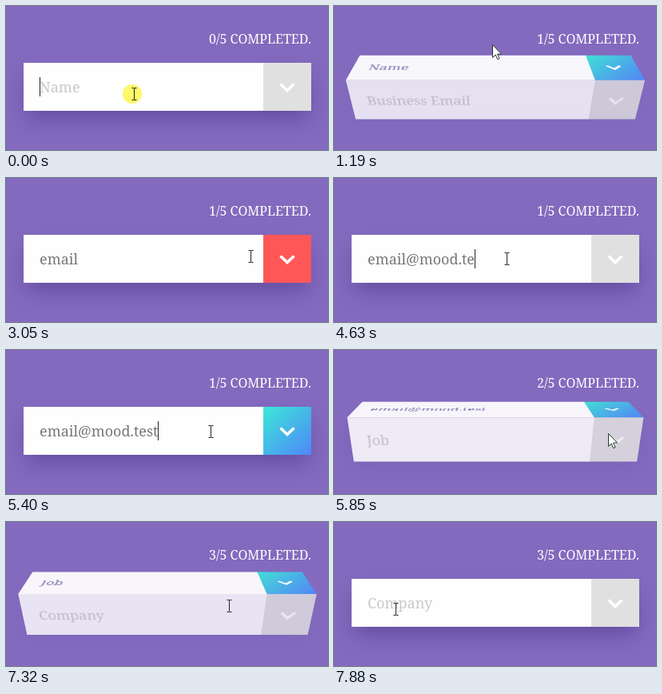
An HTML page that plays this animation: 403 by 180 pixels, repeating every 8000 ms.

```html
<!DOCTYPE html>
<html lang="en">
<head>
<meta charset="utf-8">
<title>Step form</title>
<style>
html, body { margin: 0; width: 100%; height: 100%; overflow: hidden; background: #836abe; }
body { position: relative; font: 300 18px "Roboto Slab", "Noto Serif", serif; }
#count { position: absolute; right: 21px; top: 31px; font-size: 16px; line-height: 20px; color: #fff; }
#box { position: absolute; left: 22px; top: 71px; width: 360px; height: 60px; perspective: 500px; }
#shadow { position: absolute; inset: 0; box-shadow: 0 14px 26px -4px rgba(45, 25, 110, .36); }
.face { position: absolute; inset: 0; background: #fefefe; backface-visibility: hidden; }
.text { position: absolute; left: 20px; line-height: 60px; white-space: pre; color: #777; }
.old .text { color: #8078ae; }
.label { color: #c9c9c9; }
.caret { position: absolute; top: 18px; width: 1px; height: 24px; background: #222; }
.button, .button * { position: absolute; right: 0; top: 0; width: 60px; height: 60px; }
.button { background: #e0e0e0; }
.bad { background: #ff5757; }
.ok { background: linear-gradient(135deg, #3ce8d6, #4f86fa); }
.button svg, #beam, #arrow { fill: none; stroke: #fff; stroke-width: 3.6; }
#halo { position: absolute; left: 146px; top: 98px; width: 24px; height: 24px; border-radius: 50%; background: #fdf968; }
#beam, #arrow { position: absolute; left: 0; top: 0; width: 14px; height: 22px; overflow: visible; }
#beam { stroke: #222; stroke-width: 1; }
#arrow { fill: #fff; stroke: #263a26; stroke-width: 1; }
</style>
</head>
<body>
<div id="count"></div>
<div id="box"><div id="shadow"></div></div>
<div id="halo"></div>
<svg id="beam"><path d="M-3-7.5h2.5l.5.5.5-.5H3M0-7V7M-3 7.5h2.5L0 7l.5.5H3"/></svg>
<svg id="arrow"><path d="M.5.5v16l3.7-3.5 2.5 5.7 2.4-1-2.5-5.6h5z"/></svg>
<script>
const LOOP = 8000, TURN = 600;
const $ = id => document.getElementById(id);

// keys: [start, ms per character, text]; go: when the box turns to the next step
const steps = [
  { label: 'Name', keys: [[300, 130, 'Name']], ok: 320, go: 970 },
  { label: 'Business Email', keys: [[2420, 90, 'email'], [4190, 58, '@mood.test']], bad: [2820, 4190], ok: 4720, go: 5560 },
  { label: 'Job', keys: [[6300, 80, 'Job']], ok: 6300, go: 7080 },
  { label: 'Company', keys: [] }
];
const caretOn = [[0, 960], [1630, 2140], [2410, 2880], [4000, 5540], [6140, 7060], [7690, 7880]];
// time, x, y
const path = [
  [260, 160, 110], [800, 198, 48], [1780, 198, 48], [2140, 240, 102], [2500, 240, 102],
  [2820, 345, 102], [2900, 345, 102], [3050, 306, 98], [3420, 230, 101], [3950, 216, 101],
  [4960, 216, 101], [5330, 256, 102], [5410, 256, 102], [5550, 348, 104], [5810, 348, 104],
  [6290, 107, 107], [6700, 107, 107], [7040, 348, 104], [7140, 348, 104], [7690, 77, 109]
];

const clamp = v => Math.min(1, Math.max(0, v));
const smooth = v => v * v * (3 - 2 * v);
const fade = (t, start, ms = 220) => clamp((t - start) / ms);

function makeFace() {
  const el = document.createElement('div');
  el.className = 'face';
  el.innerHTML = `<div class="text"><span class="typed"></span><i class="caret"></i><span class="label"></span></div>
    <div class="button"><div class="bad"></div><div class="ok"></div>
    <svg><path d="M21.5 26.5 30 34.5 38.5 26.5"/></svg></div>`;
  $('box').append(el);
  const part = name => el.querySelector('.' + name);
  return { el, typed: part('typed'), caret: part('caret'), label: part('label'), bad: part('bad'), ok: part('ok') };
}
const oldFace = makeFace(), newFace = makeFace();
oldFace.el.classList.add('old');

function fill(face, step, t, caret) {
  const typed = step.keys.map(([start, ms, text]) =>
    text.slice(0, Math.max(0, Math.floor((t - start) / ms) + 1))).join('');
  face.typed.textContent = typed;
  face.label.textContent = typed ? '' : step.label;
  face.caret.style.display = caret ? '' : 'none';
  face.ok.style.opacity = step.ok ? fade(t, step.ok) : 0;
  face.bad.style.opacity = step.bad ? fade(t, step.bad[0]) - fade(t, step.bad[1]) : 0;
}

function pointAt(t) {
  const i = path.findIndex(k => k[0] > t);
  if (i < 1) return (i ? path[path.length - 1] : path[0]).slice(1);
  const [a, b] = [path[i - 1], path[i]];
  const p = smooth((t - a[0]) / (b[0] - a[0]));
  return [a[1] + (b[1] - a[1]) * p, a[2] + (b[2] - a[2]) * p];
}

function draw(t) {
  const n = steps.filter(s => s.go <= t).length;
  const p = n ? 1 - (1 - fade(t, steps[n - 1].go, TURN)) ** 2.1 : 1;
  const turning = p < 1;
  const bump = Math.sin(Math.PI * p);
  const pose = angle => `translateZ(${8 * bump - 30}px) rotateX(${angle}deg) translateZ(30px)`;

  $('count').textContent = n + '/5 COMPLETED.';
  $('shadow').style.opacity = turning ? 1 - bump : 1;

  fill(newFace, steps[n], t, !turning && caretOn.some(([a, b]) => t >= a && t < b));
  newFace.el.style.transform = turning ? pose(90 * p - 90) : 'none';
  newFace.el.style.opacity = turning ? .48 + .52 * p : 1;
  oldFace.el.style.display = turning ? '' : 'none';
  if (turning) {
    fill(oldFace, steps[n - 1], t, false);
    oldFace.el.style.transform = pose(90 * p);
    oldFace.el.style.opacity = 1 - .08 * p;
  }

  const [x, y] = pointAt(t);
  const overField = x < 322 && y > 71;
  $('halo').style.display = t < 30 ? '' : 'none';
  $('beam').style.display = overField ? '' : 'none';
  $('arrow').style.display = overField ? 'none' : '';
  $('beam').style.transform = $('arrow').style.transform =
    `translate(${Math.round(x) + (overField ? .5 : 0)}px, ${Math.round(y)}px)`;
}

const begin = performance.now();
function tick() {
  draw((performance.now() - begin) % LOOP);
  requestAnimationFrame(tick);
}
tick();
</script>
</body>
</html>
```
